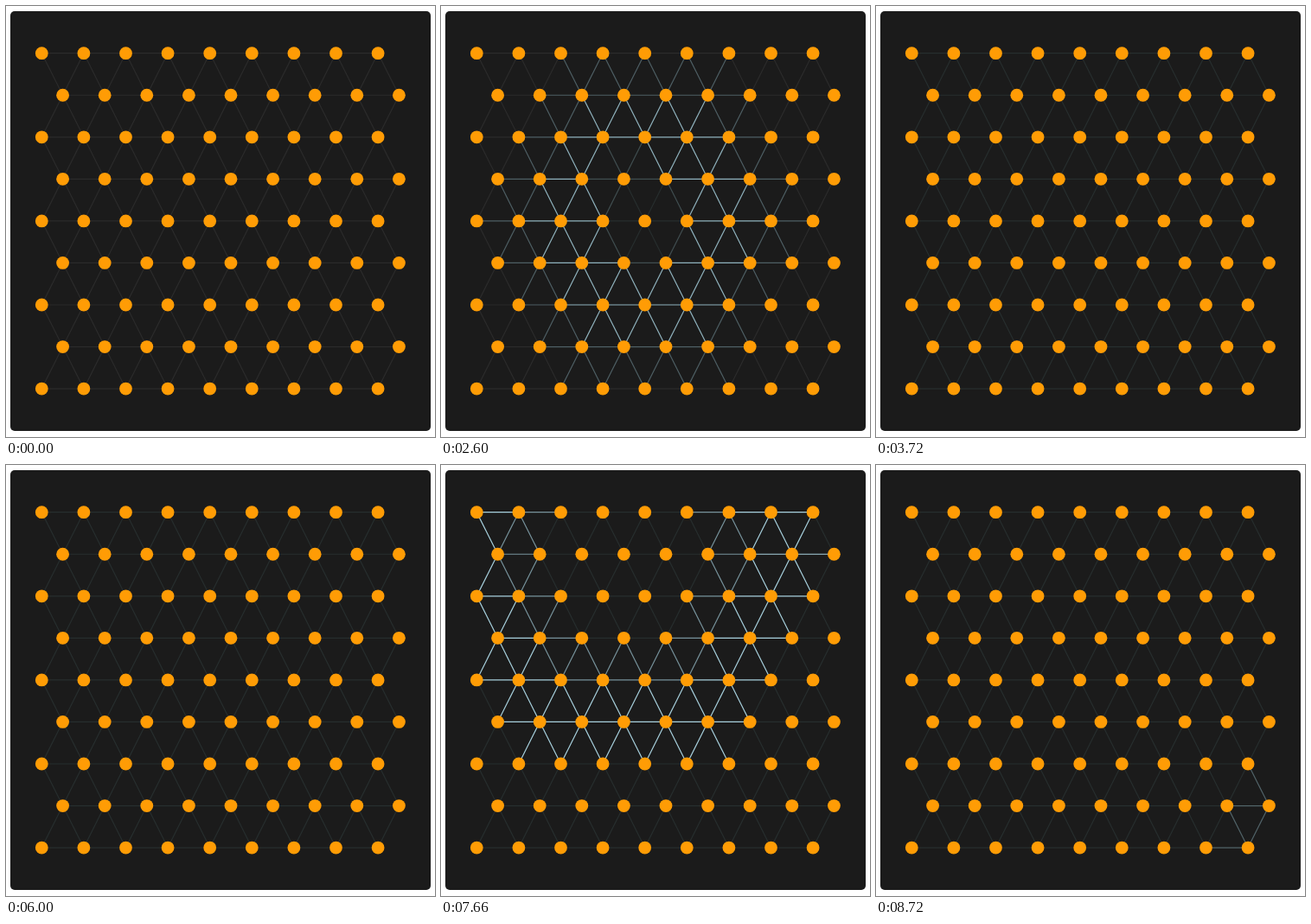
An HTML page with a canvas for the animation above (9300 ms loop, 496 px wide and 499 px high).

```html
<!DOCTYPE html>
<html lang="en">
<head>
<meta charset="utf-8">
<title>Message flood on a triangular grid</title>
<style>
  html, body { margin: 0; width: 100%; height: 100%; overflow: hidden; background: #fff; }
  canvas { display: block; }
</style>
</head>
<body>
<canvas id="stage" width="496" height="499"></canvas>
<script>
const ctx = document.getElementById("stage").getContext("2d");
const LOOP = 9300, SIZE = 9, STEP = 48.6;
const HOP = 195, RISE = 55, FADE = 450;
const IDLE = [43, 43, 43], RESTED = [39, 46, 46], LIT = [173, 216, 230];

// Each wave floods from a node; edges out of a hub are not answered back.
const waves = [
  { start: 2000, from: [4, 4], hub: [3, 3] },
  { start: 6790, from: [1, 3], hub: [1, 7] }
];

const nodes = [];
for (let row = 0; row < SIZE; row++) {
  for (let col = 0; col < SIZE; col++) {
    const shift = (row % 2) / 2;
    nodes.push({ row, col, u: col + shift, x: 41.3 + (col + shift) * STEP, y: 54.7 + row * 48.55 });
  }
}
const nodeAt = ([row, col]) => nodes[row * SIZE + col];

function hops(a, b) {
  const dy = Math.abs(a.row - b.row);
  return Math.max(dy, Math.abs(a.u - b.u) + dy / 2);
}

const edges = [];
nodes.forEach((a, i) => {
  for (const b of nodes.slice(i + 1)) {
    if (hops(a, b) === 1) edges.push({ a, b, fires: waves.map(w => fireTimes(a, b, w)) });
  }
});

function fireTimes(a, b, wave) {
  const source = nodeAt(wave.from), hub = nodeAt(wave.hub);
  let da = hops(a, source), db = hops(b, source), near = a;
  if (db < da) {
    [da, db] = [db, da];
    near = b;
  }
  const times = [wave.start + da * HOP];
  if (db > da && near !== source && near !== hub) times.push(wave.start + db * HOP);
  return times;
}

function glow(age) {
  if (age <= 0 || age >= FADE) return 0;
  return Math.min(age / RISE, 1 - (age / FADE) ** 2);
}

function edgeColor(edge, t) {
  const level = Math.max(...edge.fires.flat().map(at => glow(t - at)));
  const base = t > edge.fires[0][0] ? RESTED : IDLE;
  return "rgb(" + base.map((v, i) => Math.round(v + (LIT[i] - v) * level)) + ")";
}

function draw(t) {
  ctx.fillStyle = "#fff";
  ctx.fillRect(0, 0, 496, 499);
  ctx.fillStyle = "#1b1b1b";
  ctx.beginPath();
  ctx.roundRect(5, 6, 486, 486, 5);
  ctx.fill();

  ctx.lineWidth = 1.2;
  for (const e of edges) {
    ctx.strokeStyle = edgeColor(e, t);
    ctx.beginPath();
    ctx.moveTo(e.a.x, e.a.y);
    ctx.lineTo(e.b.x, e.b.y);
    ctx.stroke();
  }

  ctx.fillStyle = "#ff9c05";
  for (const n of nodes) {
    ctx.beginPath();
    ctx.arc(n.x, n.y, 7.4, 0, Math.PI * 2);
    ctx.fill();
  }
}

const begin = performance.now();
function tick() {
  draw((performance.now() - begin) % LOOP);
  requestAnimationFrame(tick);
}
tick();
</script>
</body>
</html>
```
